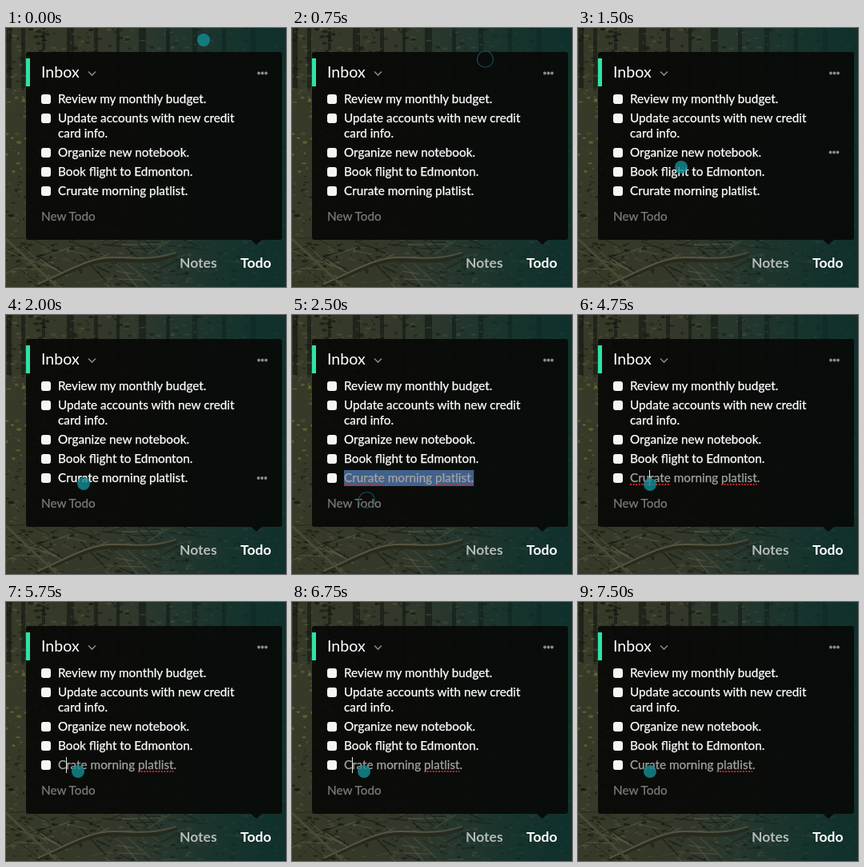
These frames come from a looping animation (350x324 px, 8000 ms). An HTML page:

```html
<!DOCTYPE html>
<html lang="en">
<head>
<meta charset="utf-8">
<title>Todo inbox</title>
<style>
  html, body { margin: 0; width: 100%; height: 100%; overflow: hidden; background: #17231f; }
  svg { display: block; width: 350px; height: 324px; }
  text { font: 15.3px Lato, sans-serif; fill: #fff; white-space: pre; }
  .row { stroke: currentColor; stroke-width: .25px; color: #fff; fill: currentColor; }
  .title { font-size: 19.6px; }
  .tab { font-size: 17.5px; font-weight: 700; }
</style>
</head>
<body>
<svg viewBox="0 0 350 324">
  <defs>
    <linearGradient id="forest">
      <stop offset="0" stop-color="#373a28"/>
      <stop offset=".35" stop-color="#33382a"/>
      <stop offset=".65" stop-color="#28382f"/>
      <stop offset="1" stop-color="#173430"/>
    </linearGradient>
    <linearGradient id="mist">
      <stop offset=".45" stop-color="#0f302c" stop-opacity="0"/>
      <stop offset="1" stop-color="#0f302c" stop-opacity=".85"/>
    </linearGradient>
    <g id="dots" fill="#8b8b89">
      <circle cx="-4.5" r="1.9"/><circle r="1.9"/><circle cx="4.5" r="1.9"/>
    </g>
  </defs>

  <rect width="350" height="324" fill="url(#forest)"/>
  <g id="woods"></g>
  <g fill="none" stroke-linecap="round">
    <path d="M40 322C82 304 102 290 135 290S180 295 212 284" stroke="#282a1e" stroke-width="5"/>
    <path d="M40 320C84 301 104 287 135 287S180 291 212 281" stroke="#575641" stroke-width="2"/>
    <path d="M0 264L62 322" stroke="#4d4935" stroke-width="3"/>
  </g>
  <rect width="350" height="324" fill="url(#mist)"/>

  <path d="M28 30H342a3 3 0 0 1 3 3V262a3 3 0 0 1-3 3H320l-7 6-7-6H28a3 3 0 0 1-3-3V33a3 3 0 0 1 3-3Z"
    fill="#080907" fill-opacity=".92"/>
  <rect x="25" y="38" width="5" height="35" fill="#2fe3a4"/>
  <text class="title" x="44" y="62">Inbox</text>
  <path d="M103 54.5l4.5 4.5 4.5-4.5" fill="none" stroke="#858585" stroke-width="1.6"/>
  <use href="#dots" x="320.5" y="56.5"/>

  <g id="boxes" fill="#f5f5f5"></g>
  <text class="row" x="65" y="94">Review my monthly budget.</text>
  <text class="row" x="65" y="118">Update accounts with new credit</text>
  <text class="row" x="65" y="137">card info.</text>
  <text class="row" x="65" y="161">Organize new notebook.</text>
  <text class="row" x="65" y="185">Book flight to Edmonton.</text>
  <rect id="selection" x="65" y="194" height="20" fill="#42618a"/>
  <text id="draft" class="row" x="65" y="209"></text>
  <path id="spelling" fill="none" stroke="#c3282b" stroke-width="2" stroke-dasharray="2 1.6"/>
  <rect id="caret" y="194" width="1" height="20" fill="#e8e8e8"/>
  <text class="row" x="44" y="241" style="color:#7b7b79">New Todo</text>
  <use id="rowMenu" href="#dots" x="320"/>

  <text class="tab" x="217" y="300" style="fill:#b3bab7">Notes</text>
  <text class="tab" x="293" y="300">Todo</text>
  <circle id="pointer"/>
</svg>
<script>
const $ = id => document.getElementById(id);
const LOOP = 8000;

// Each entry holds until the next: time, x, y, hollow
const pointerSteps = [
  [0, 247, 15], [250, 245, 18], [500, 241.5, 37.5, true], [750, 241.5, 39, true],
  [1000, 219.5, 58.5, true], [1250, 168, 122], [1500, 129, 174], [1750, 104, 205],
  [2000, 97, 211], [2250, 93.5, 231.5, true], [2750, 93, 231.5, true],
  [3000, 90, 232, true], [3250, 90, 212], [3500, 86.5, 232, true],
  [4000, 86, 232, true], [4250, 90, 212]
];
// time, first word, caret index (-1 when hidden)
const draftSteps = [
  [0, 'Crurate', -1], [3750, 'Crurate', 3], [4250, 'Crurate', -1], [4750, 'Crurate', 3],
  [5250, 'Crrate', 2], [5750, 'Crate', 1], [6250, 'Crate', -1], [6750, 'Crate', 1],
  [7000, 'Curate', 2], [7500, 'Curate', -1]
];
const menuSteps = [[0, 0], [1500, 155.5], [1750, 204], [2500, 0]];

const at = (steps, t) => steps.findLast(step => step[0] <= t);
const set = (el, attrs) => { for (const k in attrs) el.setAttribute(k, attrs[k]); };
const show = (el, on) => { el.style.display = on ? '' : 'none'; };

function add(parent, tag, attrs) {
  const el = document.createElementNS('http://www.w3.org/2000/svg', tag);
  set(el, attrs);
  parent.append(el);
}

function plantWoods() {
  let seed = 17;
  const random = () => (seed = seed * 16807 % 2147483647) / 2147483647;
  const woods = $('woods');
  const twig = (x, y, length, angle, stroke, width) => add(woods, 'path', {
    d: `M${x} ${y}l${length * Math.cos(angle)} ${length * Math.sin(angle)}`,
    stroke, 'stroke-width': width, opacity: .65
  });
  for (const [x, w] of [[1, 6], [19, 5], [45, 4], [76, 9], [110, 5], [138, 4], [166, 9], [200, 5], [233, 6], [270, 5], [306, 6]])
    add(woods, 'rect', { x, width: w, height: 75, fill: '#151b14', opacity: .65 });
  // Foliage, brightest in the fern band on the left
  for (let i = 0; i < 1500; i++) {
    const x = random() * 350, y = random() * 324;
    const fern = x < 60 && y > 85 && y < 185;
    add(woods, 'ellipse', {
      cx: x, cy: y, rx: 1 + random() * 3, ry: .6 + random() * 1.4,
      fill: (fern ? ['#7d7130', '#94833a', '#35351c', '#575827']
                  : ['#535539', '#171c13', '#464b32', '#11170f'])[i % 4],
      opacity: .35 + random() * .4
    });
  }
  for (let i = 0; i < 60; i++)
    twig(random() * 230 - 20, 255 + random() * 69, 15 + random() * 35, random() * 1.5 - .6,
      ['#5b5a45', '#171b13'][i % 2], .6 + random() * 1.2);
}

function underline(word) {
  const start = $('draft').textContent.indexOf(word);
  const left = $('draft').getStartPositionOfChar(start).x;
  const right = $('draft').getEndPositionOfChar(start + word.length - 1).x;
  return `M${left} 212H${right}`;
}

function draw(t) {
  const [, x, y, hollow] = at(pointerSteps, t);
  set($('pointer'), {
    cx: x, cy: y, r: hollow ? 10 : 8,
    fill: hollow ? 'none' : '#148a93', 'fill-opacity': .82,
    stroke: hollow ? '#174c51' : 'none', 'stroke-width': 1.2
  });

  const [, word, caret] = at(draftSteps, t);
  const editing = t >= 2500, selected = editing && t < 3750;
  const draft = $('draft');
  const line = word + ' morning platlist.';
  if (draft.textContent !== line) draft.textContent = line;
  draft.style.color = editing ? '#a3a3a1' : '#fff';

  show($('selection'), selected);
  set($('selection'), { width: draft.getComputedTextLength() });
  show($('spelling'), editing);
  set($('spelling'), {
    d: (word === 'Crurate' ? underline(word) : '') + underline('platlist'),
    opacity: selected ? .65 : 1
  });
  show($('caret'), caret >= 0);
  if (caret >= 0) set($('caret'), { x: Math.round(draft.getStartPositionOfChar(caret).x) });

  const [, menuY] = at(menuSteps, t);
  show($('rowMenu'), menuY);
  set($('rowMenu'), { y: menuY });
}

plantWoods();
for (const y of [83, 107, 150, 174, 198])
  add($('boxes'), 'rect', { x: 44, y, width: 12, height: 12, rx: 3 });

const begin = performance.now();
function tick() {
  draw((performance.now() - begin) % LOOP);
  requestAnimationFrame(tick);
}
tick();
</script>
</body>
</html>
```
